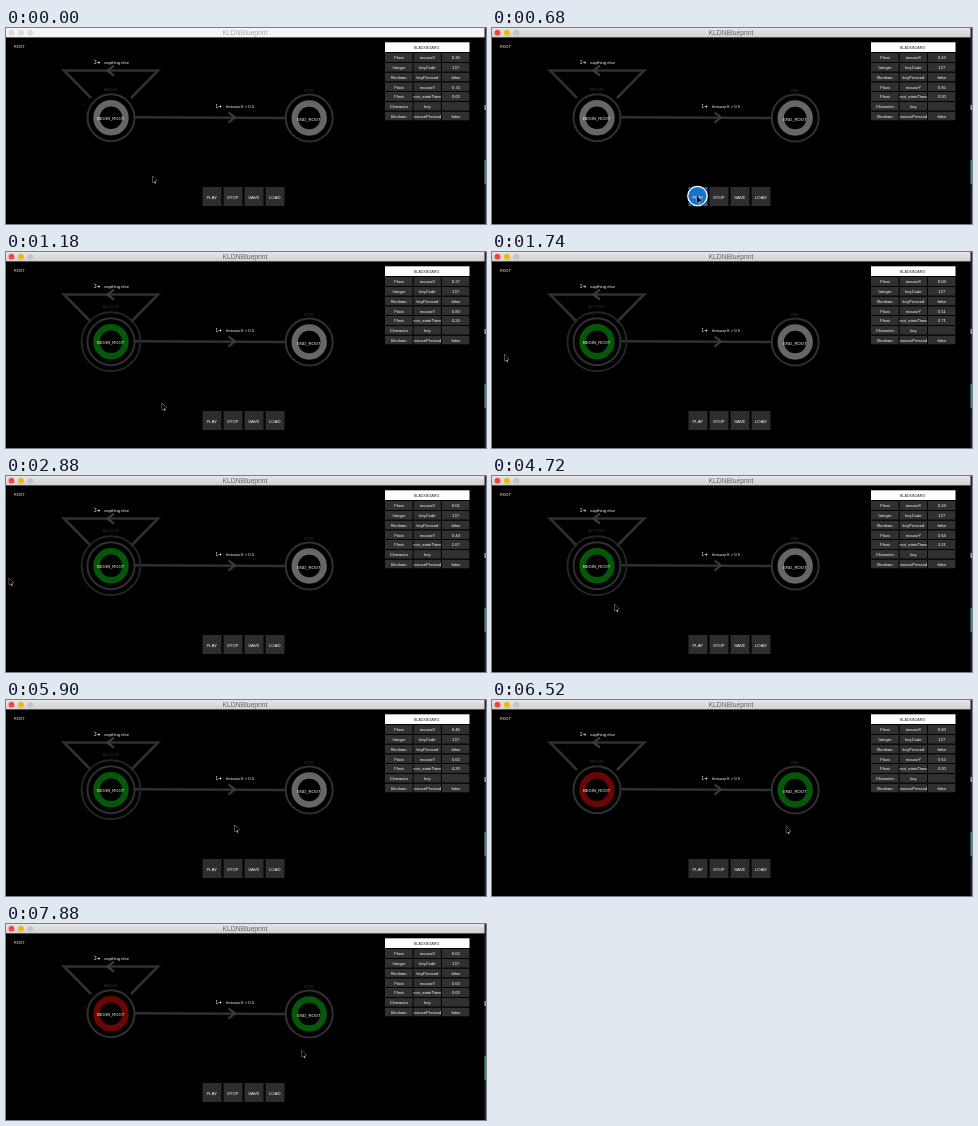
Write an HTML page with a canvas that moves like this. It is 480 by 196 pixels and loops after 8000 ms.

```html
<!DOCTYPE html>
<html lang="en">
<head>
<meta charset="utf-8">
<title>State machine</title>
<style>
html, body { margin: 0; width: 100%; height: 100%; overflow: hidden; background: #000; }
canvas { display: block; width: 480px; height: 196px; }
</style>
</head>
<body>
<canvas id="stage"></canvas>
<script>
const W = 480, H = 196, BAR = 9.4, LOOP = 8000;
const PRESS = 600, RELEASE = 820, START = 893;
const LAG = 80; // the table trails the pointer
const LINE = '#303030', IDLE = '#666', ACTIVE = '#055805', LEFT = '#6c0505';
const SANS = '"Liberation Sans", Arial, sans-serif';

const canvas = document.getElementById('stage');
const ctx = canvas.getContext('2d');
const dpr = window.devicePixelRatio || 1;
canvas.width = W * dpr;
canvas.height = H * dpr;

// turning points of the pointer: time, x, y
const PATH = [
  [-100, 143, 146.8], [600, 205, 168], [900, 205, 168], [1740, 12.7, 102.4],
  [2700, 3, 100.5], [3280, 4.6, 110], [4120, 54, 123], [4720, 122.7, 128.4],
  [5900, 228.6, 125], [6600, 296, 126.5], [LOOP, 296, 126.5]
];

function slope(i, axis) {
  if (i === 0 || i === PATH.length - 1) return 0;
  const [a, b, c] = [PATH[i - 1], PATH[i], PATH[i + 1]];
  const s = (b[axis] - a[axis]) / (b[0] - a[0]);
  const e = (c[axis] - b[axis]) / (c[0] - b[0]);
  return s * e <= 0 ? 0 : 2 * s * e / (s + e);
}

// monotone cubic through the turning points
function along(t, axis) {
  let i = 0;
  while (i < PATH.length - 2 && PATH[i + 1][0] <= t) i++;
  const a = PATH[i], b = PATH[i + 1], d = b[0] - a[0];
  const u = (t - a[0]) / d, v = 1 - u;
  return v * v * (1 + 2 * u) * a[axis] + u * v * v * d * slope(i, axis) +
    u * u * (3 - 2 * u) * b[axis] - u * u * v * d * slope(i + 1, axis);
}

const pointer = t => ({ x: along(t, 1), y: along(t, 2) });

function rect(x, y, w, h, color) {
  ctx.fillStyle = color;
  ctx.fillRect(x, y, w, h);
}

function text(str, x, y, size = 4.2, color = '#fff', align = 'center') {
  ctx.font = `${size}px ${SANS}`;
  ctx.textAlign = align;
  ctx.fillStyle = color;
  ctx.fillText(str, x, y + size * 0.36);
}

function disc(x, y, r, color) {
  ctx.beginPath();
  ctx.arc(x, y, r, 0, Math.PI * 2);
  ctx.fillStyle = color;
  ctx.fill();
}

function ring(x, y, r, width, color) {
  ctx.beginPath();
  ctx.arc(x, y, r, 0, Math.PI * 2);
  ctx.lineWidth = width;
  ctx.strokeStyle = color;
  ctx.stroke();
}

function line(points, width, color) {
  ctx.beginPath();
  points.forEach(([x, y]) => ctx.lineTo(x, y));
  ctx.lineWidth = width;
  ctx.strokeStyle = color;
  ctx.stroke();
}

function chevron(x, y, dir) {
  const back = x - 6.5 * dir;
  line([[back, y - 5], [x, y], [back, y + 5]], 2.2, '#3c3c3c');
}

function titleBar(active) {
  const g = ctx.createLinearGradient(0, 0, 0, BAR);
  g.addColorStop(0, active ? '#e6e6e6' : '#f5f5f5');
  g.addColorStop(1, active ? '#d0d0d0' : '#f5f5f5');
  rect(0, 0, W, BAR, g);
  const idle = active ? '#c6c6c6' : '#dcdcdc';
  const dots = active ? ['#f5453e', '#e6b81e', idle] : [idle, idle, idle];
  dots.forEach((c, i) => disc(5.5 + i * 9.4, 4.7, 2.9, c));
  text('KLDNBlueprint', 239, 4.8, 6.8, active ? '#666' : '#aaa');
}

function desktopEdge() {
  const x = 478.5;
  rect(x, 0, W - x, H, '#20272c');
  rect(x, 77, W - x, 5, '#9aa0a0');
  rect(x, 132, W - x, 24, '#2b9c78');
}

function transition(label, rule, x, y) {
  text(label, x, y, 4.6, '#fff', 'left');
  text(rule, x + 10.3, y, 4.2, '#fff', 'left');
}

function transitions() {
  line([[85, 70], [58, 42.5], [152, 42.5], [125, 70]], 2.6, LINE);
  chevron(101.5, 42.7, -1);
  line([[129, 89.3], [279, 90]], 2.6, LINE);
  chevron(229, 89.5, 1);
  transition('2➜', 'anything else', 88, 34.3);
  transition('1➜', '#mouseX > 0.5', 209.5, 78.8);
}

function state(x, y, name, label, color, running) {
  if (running) {
    ring(x, y, 29.5, 1.8, '#262626');
    text('ACTION', x - 0.5, y - 35.5, 4.2, '#303030');
  }
  text(label, x - 0.5, y - 28, 4.2, running ? '#222' : '#363636');
  ring(x, y, 23.5, 2, LINE);
  ring(x, y, 14.5, 6.4, color);
  text(name, x - 0.3, y + 1);
}

function blackboard(t, running) {
  const p = pointer(t - LAG);
  const timer = running ? 0.839 * (t - START) / 1000 : 0;
  const rows = [
    ['Float', 'mouseX', (p.x / W).toFixed(2)],
    ['Integer', 'keyCode', '157'],
    ['Boolean', 'keyPressed', 'false'],
    ['Float', 'mouseY', ((p.y - 10) / (H - 10)).toFixed(2)],
    ['Float', 'root_stateTimer', timer.toFixed(2)],
    ['Character', 'key', ''],
    ['Boolean', 'mousePressed', 'false']
  ];
  rect(379, 14.3, 84.5, 9.7, '#fff');
  text('BLACKBOARD', 420.5, 19.5, 3.7, '#222');
  rows.forEach((cells, r) => {
    const y = 25 + r * 9.75;
    cells.forEach((str, c) => {
      const x = 379 + c * 28.4;
      ctx.save();
      ctx.beginPath();
      ctx.rect(x, y, 27.8, 9);
      ctx.clip();
      rect(x, y, 27.8, 9, '#303030');
      text(str, x + 14, y + 4.9);
      ctx.restore();
    });
  });
}

function buttons(p) {
  ['PLAY', 'STOP', 'SAVE', 'LOAD'].forEach((str, i) => {
    const x = 196.5 + i * 21;
    const over = p.x > x && p.x < x + 19 && p.y > 159 && p.y < 178;
    rect(x, 159, 19, 19, over ? '#1674cc' : '#2d2d2d');
    text(str, x + 9.3, 169, 4.3);
  });
}

function cursor({ x, y }) {
  const gray = '#b4b4b4';
  line([[x + 1.6, y + 4.5], [x + 3, y + 7.6]], 1.3, gray);
  line([[x, y], [x, y + 6.4], [x + 4.4, y + 4.6], [x, y]], 0.8, gray);
  ctx.fillStyle = '#000';
  ctx.fill();
}

function draw(t) {
  const p = pointer(t);
  const done = pointer(t - LAG).x > W / 2;
  const running = t >= START && !done;

  ctx.setTransform(dpr, 0, 0, dpr, 0, 0);
  rect(0, 0, W, H, '#000');
  titleBar(t >= PRESS);
  desktopEdge();
  text('ROOT', 8, 18.8, 3.7, '#fff', 'left');
  transitions();
  state(105, 89.7, 'BEGIN_ROOT', 'BEGIN', done ? LEFT : running ? ACTIVE : IDLE, running);
  state(303.2, 90, 'END_ROOT', 'END', done ? ACTIVE : IDLE, false);
  blackboard(t, running);
  buttons(p);
  if (t >= PRESS && t < RELEASE) {
    ring(p.x + 0.5, p.y, 10.8, 1, '#111');
    ring(p.x + 0.5, p.y, 9.7, 1.3, '#fff');
  }
  cursor(p);
}

const origin = performance.now();
function tick() {
  draw((performance.now() - origin) % LOOP);
  requestAnimationFrame(tick);
}
tick();
</script>
</body>
</html>
```
